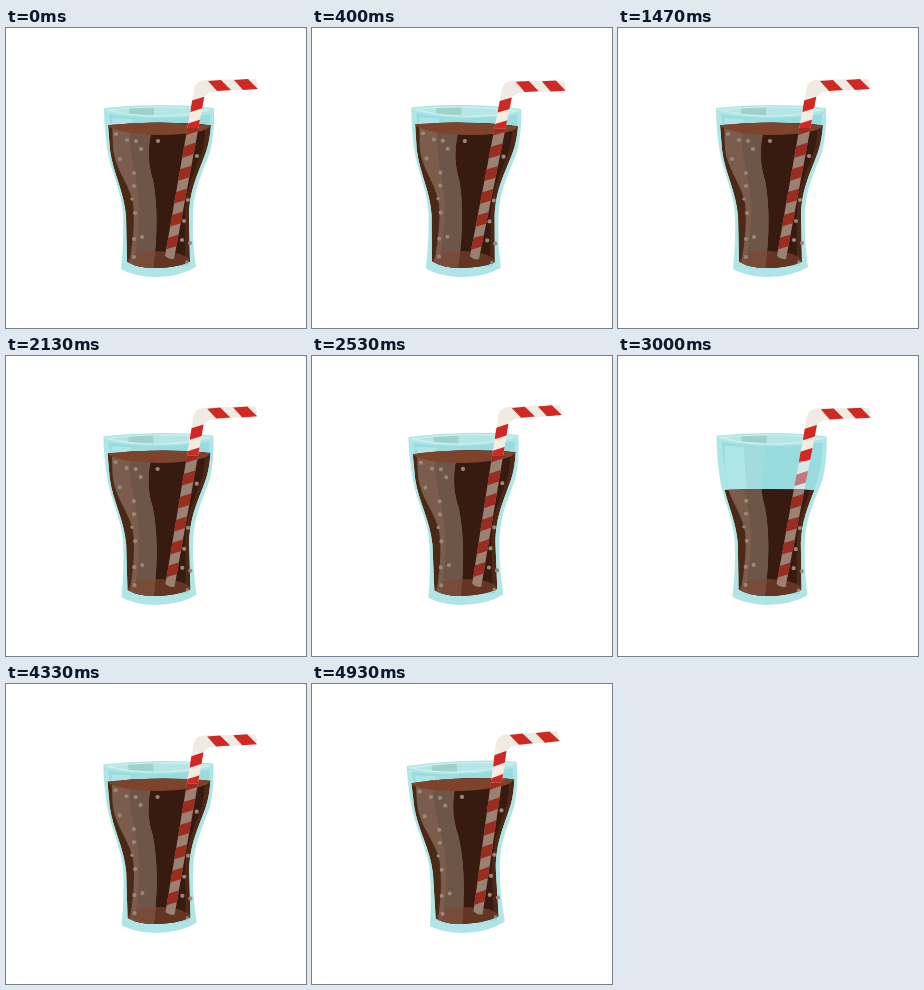
These frames come from a looping animation (300 px wide and 300 px high, 5 s). An HTML page with a canvas:

```html
<!DOCTYPE html>
<html lang="en">
<head>
<meta charset="utf-8">
<title>Drink</title>
<style>
html, body { margin: 0; width: 100%; height: 100%; overflow: hidden; background: #fff; }
canvas { display: block; }
</style>
</head>
<body>
<canvas id="stage" width="300" height="300"></canvas>
<script>
const g = document.getElementById('stage').getContext('2d');
const LOOP = 5000, FPS = 15;

const glass = new Path2D('M98 80Q125 77 153 77Q184 77 208 80Q209 104 204 124C196 146 188 160 187 186Q186 212 190 239Q174 249 148 249Q127 248 115 241Q118 212 117 187C116 163 104 143 101 119Q98 98 98 80Z');
const inside = new Path2D('M103 86Q153 94 204 86Q204 109 199 124C191 146 183 160 182 186V238H123V186C122 163 109 143 107 119Z');
const paleBand = new Path2D('M106 90L126 91Q126 128 135 150Q139 178 132 238H122V187C123 163 110 143 107 119Z');
const midBand = new Path2D('M126 91H148Q139 126 148 160Q153 190 148 239H132Q139 178 135 150Q126 128 126 91Z');
const rimHole = new Path2D('M102 82Q126 79 153 79Q184 79 204 82Q178 88 153 88Q124 88 102 82Z');
const drink = new Path2D('M102 97Q153 92 205 97Q204 112 200 124C192 146 184 160 183 187L184 234Q169 240 149 240Q132 240 121 234L120 188C118 163 107 145 104 122Z');
const core = new Path2D('M120 94H199Q200 112 195 126C187 148 180 160 179 187V242H128V187Z');
const sheen = new Path2D('M106 94H148Q138 125 147 152Q154 190 147 242H122Q130 200 127 176C124 156 109 142 107 120Z');
const sheenCore = new Path2D('M124 94H148Q138 125 147 152Q154 190 147 242H126Q138 190 130 152Q123 125 124 94Z');
const surface = new Path2D('M102 97Q153 92 205 97Q202 106 153 107Q114 106 102 98Z');
const base = new Path2D('M121 233Q126 223 152 223Q180 224 184 233Q175 240 152 240Q130 240 121 233Z');
const pipe = new Path2D('M159 228L188 62Q191 53 202 53L199 65L168 231Q163 232 159 228Z');
const arm = new Path2D('M188 64Q188 53 198 52L250 51L252 57L250 61L204 64L198 69Z');
const armReds = new Path2D('M202 53L215 52L225 62L211 63ZM228 52L242 51L252 61L237 62Z');

const bubbles = [
  [110,106], [121,112], [130,113], [135,121], [152,113], [114,131], [128,145],
  [180,132], [191,128], [128,158], [126,171], [129,185], [182,172], [178,193],
  [128,211], [136,209], [176,212], [184,215], [181,234], [128,229]
];

// Tilt in degrees: time, angle
const tilt = [
  [0,0], [300,1], [700,.6], [870,.1], [1470,0], [2130,-.4], [2450,-1.1], [2800,0],
  [3000,.4], [3400,.8], [3730,.9], [4000,.6], [4300,-.5], [4700,-2], [5000,-2.4]
];

function tiltAt(t) {
  const i = tilt.findIndex(k => k[0] > t);
  const [t0, a] = tilt[i - 1], [t1, b] = tilt[i];
  const u = (t - t0) / (t1 - t0);
  return a + (b - a) * u * u * (3 - 2 * u);
}

function levelAt(t) {
  const p = t % 2500;
  return p < 420 || p >= 1400 ? 94 : p < 1000 ? 133 : 188;
}

function fill(path, color) {
  g.fillStyle = color;
  g.fill(path);
}

function clipped(path, draw) {
  g.save();
  g.clip(path);
  draw();
  g.restore();
}

function band(top, bottom) {
  const p = new Path2D();
  p.rect(90, top, 130, bottom - top);
  return p;
}

function drawPipe(top, bottom, white, red) {
  if (bottom <= top) return;
  clipped(band(top, bottom), () => clipped(pipe, () => {
    g.fillStyle = white;
    g.fillRect(150, 50, 60, 185);
    g.fillStyle = red;
    for (let i = 0; i < 7; i++) {
      const y = 76 + i * 23, x = 192.5 - (y - 76) * .19;
      g.beginPath();
      g.moveTo(x - 8, y - 3);
      g.lineTo(x + 8, y - 8);
      g.lineTo(x + 8, y + 3);
      g.lineTo(x - 8, y + 8);
      g.fill();
    }
  }));
}

function drawDrink(level) {
  const full = level < 100;
  const wet = new Path2D();
  wet.moveTo(90, level + 2);
  wet.quadraticCurveTo(153, level - (full ? 6 : 2), 220, level + 2);
  wet.lineTo(220, 250);
  wet.lineTo(90, 250);
  clipped(wet, () => clipped(drink, () => {
    fill(drink, '#4c2817');
    fill(core, '#381b10');
    fill(sheen, '#7b5d4d');
    fill(sheenCore, '#6d5548');
    fill(base, 'rgba(128,70,48,.6)');
    if (full) fill(surface, '#7d432b');
  }));
}

function drawBubbles(level) {
  g.fillStyle = '#998779';
  for (const [x, y] of bubbles) {
    if (y < level + 7) continue;
    g.beginPath();
    g.arc(x, y, y % 3 ? 2.1 : 1.6, 0, 7);
    g.fill();
  }
}

function draw(t) {
  const level = levelAt(t);
  g.clearRect(0, 0, 300, 300);
  g.save();
  g.translate(150, 165);
  g.rotate(tiltAt(t) * Math.PI / 180);
  g.translate(-150, -165);

  fill(glass, '#afe5e5');
  fill(inside, '#98dce0');
  fill(paleBand, '#aee5e7');
  fill(midBand, '#a3dcde');
  fill(rimHole, '#b5e6e5');
  clipped(rimHole, () => {
    g.fillStyle = '#a0cfcc';
    g.fillRect(123, 76, 25, 14);
  });
  g.strokeStyle = '#d0f0ef';
  g.lineWidth = 1.2;
  g.stroke(rimHole);
  drawDrink(level);
  drawBubbles(level);

  const dry = Math.min(105, level + 6);
  drawPipe(50, dry, '#f2ece3', '#d02823');
  drawPipe(dry, level, '#d5e9e8', '#c4777a');
  drawPipe(Math.max(dry, level), 240, '#9a8273', '#9a2c20');
  fill(arm, '#f0ebe2');
  fill(armReds, '#d02823');
  g.restore();
}

const start = performance.now();
function tick() {
  const t = (performance.now() - start) % LOOP;
  draw(Math.floor(t * FPS / 1000) * 1000 / FPS);
  requestAnimationFrame(tick);
}
tick();
</script>
</body>
</html>
```
